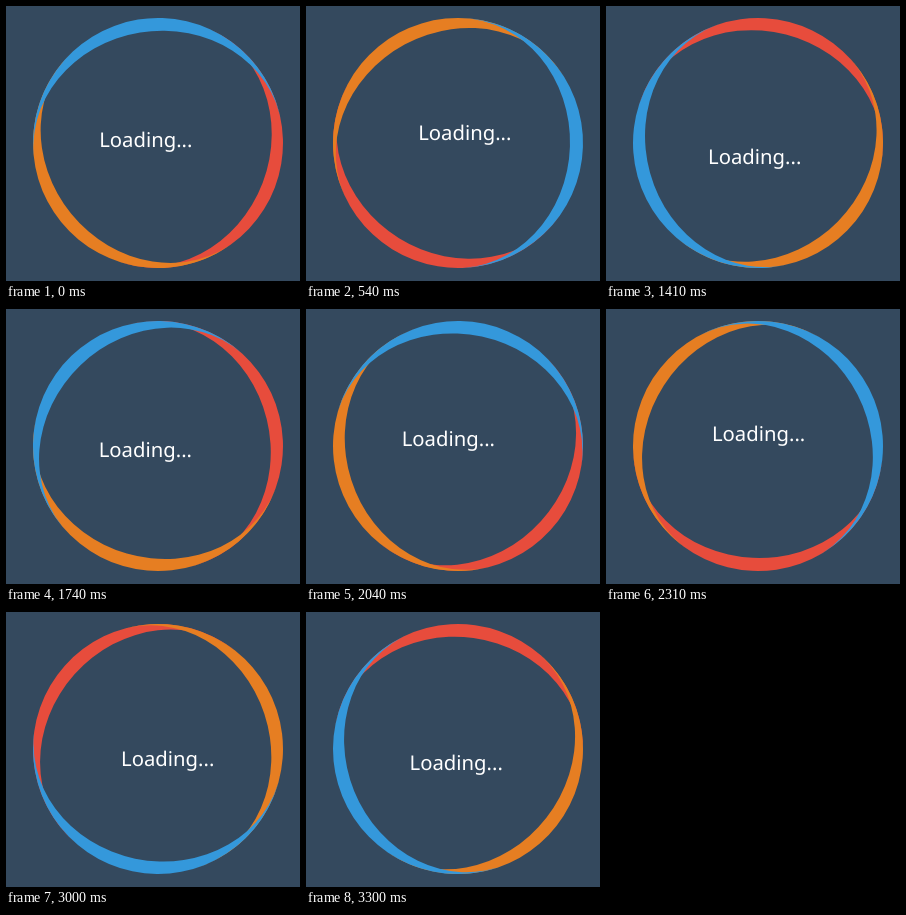
An HTML page for the animation above (3.33 s loop, 294 px wide and 275 px high).

```html
<!DOCTYPE html>
<html lang="en">
<head>
<meta charset="utf-8">
<title>Loading</title>
<style>
  html, body { margin: 0; width: 100%; height: 100%; overflow: hidden; background: #34495e; }
  svg { display: block; }
  text { font: 20.3px "Noto Sans", "Open Sans", sans-serif; fill: #fff; text-anchor: middle; text-rendering: geometricPrecision; }
</style>
</head>
<body>
<svg width="294" height="275" viewBox="0 0 294 275">
  <defs>
    <!-- half ring, 13 thick at the top, tapering to nothing at both sides -->
    <path id="arc" d="M-125 0A125 125 0 0 1 125 0A125 112 0 0 0 -125 0Z"/>
  </defs>
  <g transform="translate(152 137)">
    <g id="ring">
      <use href="#arc" fill="#e74c3c" transform="rotate(120)"/>
      <use href="#arc" fill="#e67e22" transform="rotate(240)"/>
      <use href="#arc" fill="#3498db"/>
    </g>
  </g>
  <text id="label">Loading...</text>
</svg>
<script>
  const LOOP = 3330, STEP = 30;
  const START = 350.8, SPEED = 0.187; // degrees, degrees per ms
  const ORBIT = 13;
  const ring = document.getElementById('ring');
  const label = document.getElementById('label');

  function draw(ms) {
    const t = Math.floor((ms % LOOP) / STEP) * STEP;
    const angle = START + SPEED * t;
    ring.setAttribute('transform', `rotate(${angle})`);
    const a = (angle - 60) * Math.PI / 180;
    label.setAttribute('x', 152 + ORBIT * Math.sin(a));
    label.setAttribute('y', 145.3 - ORBIT * Math.cos(a));
  }

  const begin = performance.now();
  function tick() {
    draw(performance.now() - begin);
    requestAnimationFrame(tick);
  }
  tick();
</script>
</body>
</html>
```
